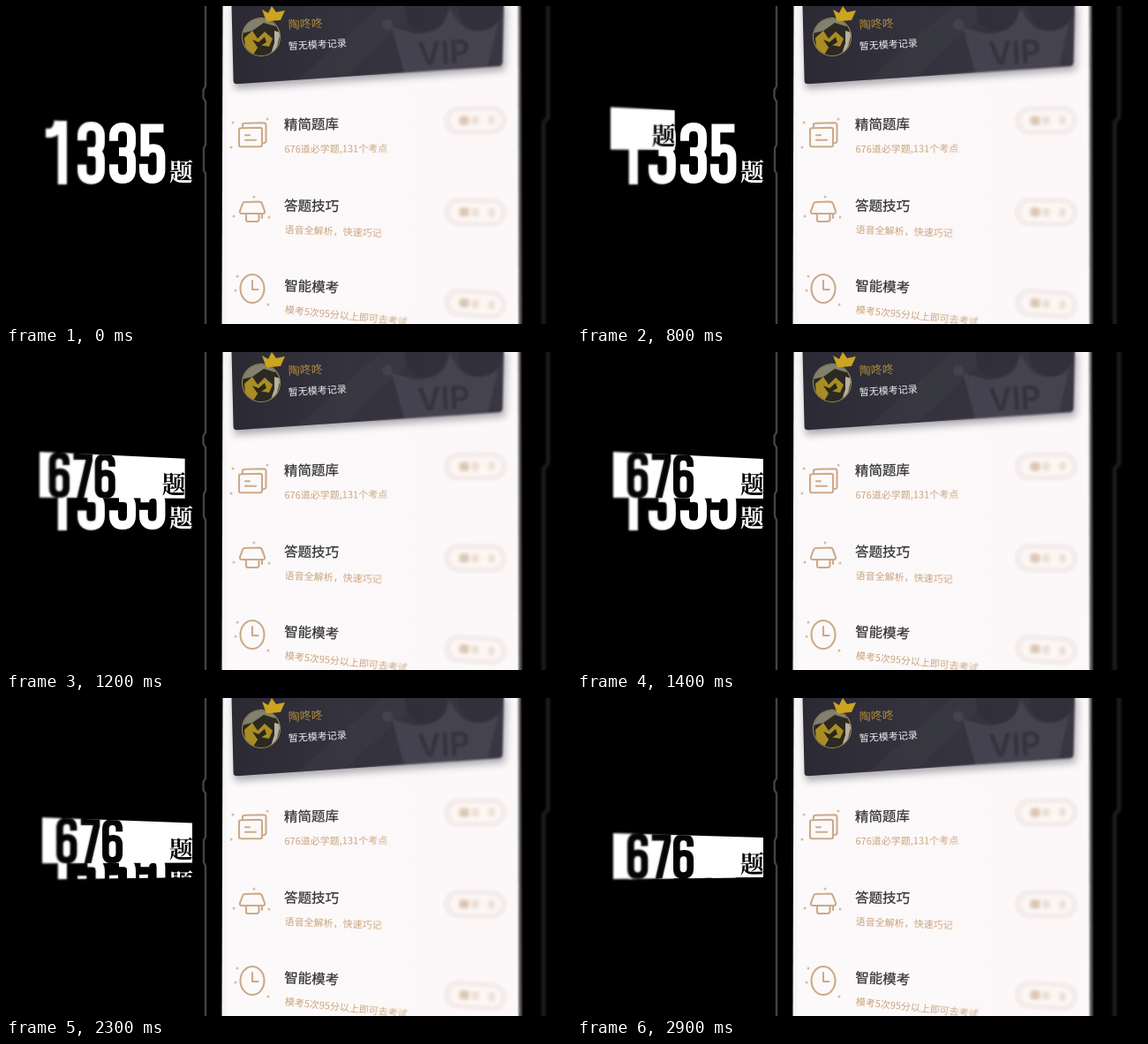
An HTML page for the animation above (3000 ms loop, 640 by 360 pixels).

```html
<!DOCTYPE html>
<html lang="zh-CN">
<head>
<meta charset="utf-8">
<title>题库</title>
<style>
  html, body { margin: 0; width: 100%; height: 100%; overflow: hidden; background: #000; }
  svg { position: absolute; left: 0; top: 0; }
  text { font-family: "Noto Sans CJK SC", "Noto Sans", sans-serif; }
  .unit { font: 900 27px "Noto Serif CJK SC", "Noto Sans CJK SC", serif; }
  .title { font-size: 15.5px; font-weight: 500; fill: #333236; stroke: #333236; stroke-width: .25; }
  .sub { font-size: 11px; fill: #c9a47c; }
  .icon { fill: none; stroke: #cbaa8a; stroke-width: 2.1; stroke-linejoin: round; stroke-linecap: round; }
  .dot { fill: #d6bda4; }
  .digit { fill: none; stroke-width: 10; }
  /* depth of field */
  .soft { position: absolute; top: 0; height: 360px; }
  #softL { left: 0; width: 125px; backdrop-filter: blur(1.3px);
    -webkit-mask-image: linear-gradient(90deg, #000 45%, transparent); mask-image: linear-gradient(90deg, #000 45%, transparent); }
  #softR { left: 395px; width: 245px; backdrop-filter: blur(1.3px);
    -webkit-mask-image: linear-gradient(90deg, transparent, #000 32%); mask-image: linear-gradient(90deg, transparent, #000 32%); }
</style>
</head>
<body>
<svg width="640" height="360" viewBox="0 0 640 360">
  <defs>
    <linearGradient id="card" x1="0" y1="0" x2="1" y2="0">
      <stop offset="0" stop-color="#2b2a34"/>
      <stop offset=".45" stop-color="#34333e"/>
      <stop offset="1" stop-color="#393743"/>
    </linearGradient>
    <linearGradient id="paper" x1="0" y1="0" x2="1" y2="0">
      <stop offset="0" stop-color="#f3f0f1"/>
      <stop offset=".02" stop-color="#fcf9fa"/>
      <stop offset="1" stop-color="#fcf8f9"/>
    </linearGradient>
    <filter id="shade" x="-10%" y="-20%" width="120%" height="150%"><feGaussianBlur stdDeviation="4"/></filter>
    <filter id="haze" x="-30%" y="-50%" width="160%" height="200%"><feGaussianBlur stdDeviation="1.5"/></filter>
    <clipPath id="face"><circle cx="289" cy="35" r="21"/></clipPath>
    <clipPath id="screen"><path d="M245.500 0H580.500L581 360H244.500Z"/></clipPath>
    <clipPath id="cardClip"><path d="M255.500 0H564L562 68L258 88.500Z"/></clipPath>
    <clipPath id="window"><path d="M38 0H213V203L38 205.500Z"/></clipPath>
    <clipPath id="bar"><path d="M41 113L211 121V166L41 165Z"/></clipPath>
    <path id="d1" d="M0 13.500H5Q13 12.500 14.500 0M18.500 0V70"/>
    <path id="d3" d="M5 21V16Q5 5 15 5T25 16V23Q25 33.500 16 33.500H11M16 33.500Q25 33.500 25 43V54Q25 65 15 65T5 54V48"/>
    <path id="d5" d="M28 5H6.500V38M6 37Q8 28.500 16 28.500Q25 28.500 25 39V54Q25 65 15 65T5 54V47"/>
    <path id="d6" d="M25 20V16Q25 5 15 5T5 16V54Q5 65 15 65T25 54V41Q25 30 15.500 30T5 40"/>
    <path id="d7" d="M1 5H24V11L11 70"/>
  </defs>

  <!-- phone -->
  <g fill="none">
    <path d="M226 0V91L223.500 95V104L226 108V157L224 161V186L226 190V360" stroke="#42424a" stroke-width="2.400"/>
    <path d="M614 0V126L609 132V360" stroke="#1a1b1e" stroke-width="5"/>
    <path d="M582 0L583 360" stroke="#77757a" stroke-width="2"/>
  </g>
  <path d="M245.500 0H580.500L581 360H244.500Z" fill="url(#paper)"/>

  <g clip-path="url(#screen)">
    <path d="M257 0H567L565 73L259 94Z" fill="#77747f" opacity=".6" filter="url(#shade)"/>
    <path d="M255.500 0H564L562.500 64Q562 68 558 68.300L262 88.200Q258 88.500 257.600 85Z" fill="url(#card)"/>
    <g clip-path="url(#cardClip)">
      <path d="M330 84L425 0H470L385 80Z" fill="#42424b" opacity=".3"/>
      <g fill="#454350">
        <circle cx="432" cy="21" r="6"/>
        <path d="M437 24L463 31Q490 34 503 3Q516 30 534 28L558 16L546 68L451 75Z"/>
      </g>
      <g fill="#31303b"><circle cx="476" cy="5" r="24"/><circle cx="537" cy="3" r="25"/></g>
      <text x="467" y="67" transform="rotate(-3 467 67)" style="font:600 36px Inter,sans-serif" fill="#34333e">VIP</text>
    </g>

    <circle cx="289" cy="35" r="22" fill="#a18c5c"/>
    <g clip-path="url(#face)">
      <path d="M266 13H312V59H266Z" fill="#2b2921"/>
      <path d="M267 14H310L305 23L292 19L279 28L267 31Z" fill="#84806f"/>
      <path d="M270 36L279 28L285 37L293 29L302 37L298 46L287 44L280 55L271 47Z" fill="#a98d24"/>
      <path d="M279 38L286 41L293 35L295 41L285 47Z" fill="#29271d"/>
      <path d="M304 28L311 30L306 50L299 57L304 42Z" fill="#b5b0a0"/>
    </g>
    <path d="M290 4L297 8L301 0L306 7L316 5L311 16L295 17.500Z" fill="#cba420"/>
    <text x="320" y="26" font-size="13" fill="#b28938" transform="rotate(-3 320 26)">陶咚咚</text>
    <text x="320" y="49.500" font-size="11" fill="#f0eff2" transform="rotate(-3.300 320 49)">暂无模考记录</text>

    <g id="rows"></g>

    <g class="icon">
      <g transform="translate(0 1.200)">
        <path d="M264 138.500Q264 137 266 137L288 136.500Q290 136.500 290 138.500V156Q290 158 288 158H266Q264 158 264 156Z"/>
        <path d="M268 136V133Q268 131.500 270 131.500L292 131Q294.500 131 294.500 133.500V152Q294 154 291 154"/>
        <path d="M271 145H276M271 150.500H283"/>
      </g>
      <path d="M270 222L287 221.500Q289 221.500 290 224L293 232Q293.500 235 291 235H267Q264.500 235 265 232L268 224Q268.500 222 270 222Z"/>
      <path d="M272 235V242Q272 244 274 244H284Q286 244 286.500 242V235M290 235V240"/>
      <ellipse cx="279" cy="320" rx="13.500" ry="16"/>
      <path d="M279 311V321H285.500"/>
    </g>
    <g id="dots" class="dot"></g>
  </g>

  <!-- counters -->
  <g clip-path="url(#window)">
    <g id="total" role="img" aria-label="1335题" stroke="#fff" fill="#fff">
      <text class="unit" x="185" y="198" stroke="none">题</text>
    </g>
    <g id="part" role="img" aria-label="676题">
      <path d="M41 113L211 121V166L41 165Z" fill="#fff"/>
      <g id="partInk" clip-path="url(#bar)" stroke="#050505" fill="#050505">
        <text class="unit" x="185" y="160.500" stroke="none">题</text>
      </g>
    </g>
  </g>
</svg>
<div class="soft" id="softL"></div>
<div class="soft" id="softR"></div>

<script>
const LOOP = 3000, STEP = 100;
const $ = id => document.getElementById(id);

function add(parent, tag, attrs, text) {
  const el = document.createElementNS('http://www.w3.org/2000/svg', tag);
  for (const k in attrs) el.setAttribute(k, attrs[k]);
  if (text) el.textContent = text;
  return parent.appendChild(el);
}

function digit(parent, n, x, y, sx, sy) {
  add(parent, 'use', { href: '#d' + n, class: 'digit', transform: `translate(${x} ${y}) scale(${sx} ${sy})` });
}

digit($('total'), 1, 45, 130, 1.02, 1.03);
digit($('total'), 3, 81, 131, 1.03, 1.01);
digit($('total'), 3, 117, 132, 1, .985);
digit($('total'), 5, 151, 133.5, .98, .965);
digit($('partInk'), 6, 57, 113.5, .78, .74);
digit($('partInk'), 7, 84, 115, .77, .73);
digit($('partInk'), 6, 109, 115.5, .77, .72);

// title, subtitle, baselines, tilts, button centre and tilt
const rows = [
  ['精简题库', '676道必学题,131个考点', 140, 166, -.8, -.4, 129.5, -1],
  ['答题技巧', '语音全解析，快速巧记', 231.5, 257, .6, 2.2, 233.5, 1],
  ['智能模考', '模考5次95分以上即可去考试', 322, 347.5, 2.2, 5.8, 337, 4]
];
for (const [title, sub, y1, y2, r1, r2, by, br] of rows) {
  add($('rows'), 'text', { class: 'title', x: 315, y: y1, transform: `rotate(${r1} 315 ${y1})` }, title);
  add($('rows'), 'text', { class: 'sub', x: 315.5, y: y2, transform: `rotate(${r2} 315 ${y2})` }, sub);
  const b = add($('rows'), 'g', { transform: `translate(531.5 ${by}) rotate(${br})` });
  add(b, 'rect', { x: -36, y: -16.5, width: 72, height: 33, rx: 16.5, fill: '#f4edec' });
  add(b, 'rect', { x: -28, y: -10, width: 57, height: 20, rx: 10, fill: '#fcf6f4' });
  const ink = add(b, 'g', { filter: 'url(#haze)', fill: '#d3bba4' });
  [[-18, 11, .8], [-4, 8, .4], [15, 7, .4]].forEach(([x, w, o]) =>
    add(ink, 'rect', { x, y: -5, width: w, height: 10, rx: 3, opacity: o }));
}

[[257, 132], [255, 160], [296, 128], [281, 216], [258, 238], [298, 239], [262, 306], [260, 322], [297, 338]]
  .forEach(([cx, cy]) => add($('dots'), 'circle', { cx, cy, r: 1.5 }));

// share of the way still to go
function rest(t, start, length) {
  const u = Math.min(1, Math.max(0, (t - start) / length));
  return Math.pow(1 - u, 2.4);
}

function draw(now) {
  const t = Math.floor(now % LOOP / STEP) * STEP;
  const dx = -174 * rest(t, 640, 780);
  const drop = 1 - rest(t, 2100, 700);
  // the slant flattens as the counters sink
  const sink = `translate(41 ${40 * drop}) skewY(${-drop}) translate(-41 0)`;
  $('total').setAttribute('transform', sink);
  $('part').setAttribute('transform', `${sink} translate(${dx} ${dx * .03})`);
  $('part').setAttribute('visibility', t < 640 ? 'hidden' : 'visible');
}

const begin = performance.now();
function tick() {
  draw(performance.now() - begin);
  requestAnimationFrame(tick);
}
tick();
</script>
</body>
</html>
```
